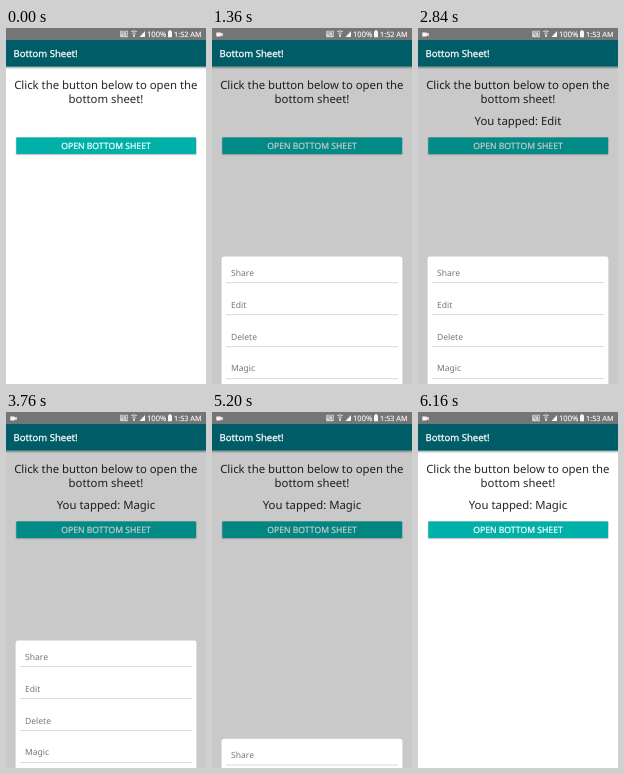
These frames come from a looping animation (200 px wide and 356 px high, 6200 ms). An HTML page:

```html
<!DOCTYPE html>
<html lang="en">
<head>
<meta charset="utf-8">
<title>Bottom Sheet</title>
<style>
html, body { margin: 0; width: 100%; height: 100%; overflow: hidden; background: #fff; }
svg { display: block; width: 200px; height: 356px; font-family: "Noto Sans", "Open Sans", sans-serif; text-rendering: geometricPrecision; }
.status { font-size: 7.3px; fill: #f6f6f6; }
.status text { stroke: #f6f6f6; stroke-width: .15; }
.title { font-size: 9.55px; fill: #fff; stroke: #fff; stroke-width: .25; }
.body { font-size: 11.35px; fill: #262626; text-anchor: middle; }
.label { font-size: 8.65px; fill: #fff; stroke: #fff; stroke-width: .2; text-anchor: middle; }
.item { font-size: 8.55px; fill: #777; }
.line { fill: #cfcfcf; }
.hit { fill: #f1f1f1; }

/* hard switches */
.cut { animation: 6.2s step-end infinite; visibility: hidden; }
#camera { animation-name: camera; }
#before { animation-name: before; }
#after { animation-name: after; }
#dim { animation-name: dim; }
#share { animation-name: share; }
#edit { animation-name: edit; }
#delete { animation-name: delete; }
#magic { animation-name: magic; }
#hit1 { animation-name: hit1; }
#hit2 { animation-name: hit2; }
#hit3 { animation-name: hit3; }
#hit4 { animation-name: hit4; }
@keyframes camera { 0% { visibility: hidden } .645%, 100% { visibility: visible } }
@keyframes before { 0% { visibility: visible } 38.71%, 100% { visibility: hidden } }
@keyframes after { 0% { visibility: hidden } 38.71%, 100% { visibility: visible } }
@keyframes dim {
  0%, 71.613%, 99.355%, 100% { visibility: hidden }
  17.419%, 82.581% { visibility: visible }
}
@keyframes share { 0%, 42.581%, 100% { visibility: hidden } 32.903% { visibility: visible } }
@keyframes edit { 0%, 49.677%, 100% { visibility: hidden } 42.581% { visibility: visible } }
@keyframes delete { 0%, 58.065%, 100% { visibility: hidden } 49.677% { visibility: visible } }
@keyframes magic { 0% { visibility: hidden } 58.065%, 100% { visibility: visible } }
@keyframes hit1 { 0%, 35.484%, 100% { visibility: hidden } 32.903% { visibility: visible } }
@keyframes hit2 { 0%, 45.806%, 100% { visibility: hidden } 42.581% { visibility: visible } }
@keyframes hit3 { 0%, 52.258%, 100% { visibility: hidden } 49.677% { visibility: visible } }
@keyframes hit4 { 0%, 60.645%, 100% { visibility: hidden } 58.065% { visibility: visible } }

/* eased motion */
#sheet { animation: sheet 6.2s ease-in-out infinite; }
@keyframes sheet {
  0%, 17.419%, 69.032%, 82.581%, 97.419%, 100% { transform: translateY(129px) }
  21.935%, 66.855%, 86.452%, 95.242% { transform: translateY(0) }
}
#press { animation: press 6.2s linear infinite; }
@keyframes press {
  0%, 14%, 20%, 81.1%, 85%, 100% { opacity: 0 }
  16.5%, 82.4% { opacity: .08 }
}
</style>
</head>
<body>
<svg viewBox="0 0 200 356">
  <defs>
    <linearGradient id="shade" x2="0" y2="1">
      <stop stop-opacity=".35"/>
      <stop offset="1" stop-opacity="0"/>
    </linearGradient>
  </defs>
  <rect width="200" height="356" fill="#fff"/>

  <g class="body">
    <text x="99.8" y="61.3">Click the button below to open the</text>
    <text x="100" y="74.8">bottom sheet!</text>
    <text id="share" class="cut" x="100" y="97.3">You tapped: Share</text>
    <text id="edit" class="cut" x="100" y="97.3">You tapped: Edit</text>
    <text id="delete" class="cut" x="100" y="97.3">You tapped: Delete</text>
    <text id="magic" class="cut" x="100" y="97.3">You tapped: Magic</text>
  </g>

  <rect x="9.7" y="109" width="180.9" height="18.2" rx="1.5" fill-opacity=".2"/>
  <rect x="10.3" y="109.4" width="179.8" height="16.7" rx="1.2" fill="#00b1aa"/>
  <rect id="press" x="10.3" y="109.4" width="179.8" height="16.7" rx="1.2"/>
  <text class="label" x="100" y="121.2">OPEN BOTTOM SHEET</text>

  <rect y="38.7" width="200" height="2.5" fill="url(#shade)"/>
  <rect id="dim" class="cut" y="38.7" width="200" height="318" fill="#060008" fill-opacity=".21"/>

  <rect width="200" height="38.7" fill="#005c66"/>
  <rect width="200" height="12" fill="#757575"/>
  <text class="title" x="7.6" y="29">Bottom Sheet!</text>

  <g class="status">
    <path id="camera" class="cut" d="M4.3 4.4h4.4v1.3l2-1v3.6l-2-1v1.3H4.3z"/>
    <path d="M114.2 2.8h7.6v6.4h-7.6z" fill-opacity=".75"/>
    <path d="M115.3 5.2q2.8.2 3 3M115.3 4h5.3v4" fill="none" stroke="#757575" stroke-width=".7"/>
    <path d="M125.2 3.6q2.8-1.4 5.6 0M126.3 5.3q1.7-.9 3.4 0" fill="none" stroke="#f6f6f6" stroke-width=".8"/>
    <path d="M127.3 6.3h1.4v2.6h-1.4z"/>
    <path d="M139 3v6h-5.5z"/>
    <text x="141" y="8.9" font-size="7.6">100%</text>
    <path d="M163 3.2v-.9h2v.9h1V9.3h-4V3.2z"/>
    <text id="before" class="cut" x="168" y="8.9">1:52 AM</text>
    <text id="after" class="cut" x="168" y="8.9">1:53 AM</text>
  </g>

  <g id="sheet">
    <rect x="9.6" y="228.4" width="180.8" height="140" rx="2.5" fill="#fff"/>
    <rect id="hit1" class="cut hit" x="14" y="233" width="172" height="22"/>
    <rect id="hit2" class="cut hit" x="14" y="265" width="172" height="22"/>
    <rect id="hit3" class="cut hit" x="14" y="297" width="172" height="22"/>
    <rect id="hit4" class="cut hit" x="14" y="329" width="172" height="22"/>
    <g class="line">
      <rect x="14" y="254.3" width="172" height=".8"/>
      <rect x="14" y="286.3" width="172" height=".8"/>
      <rect x="14" y="318.3" width="172" height=".8"/>
      <rect x="14" y="350.3" width="172" height=".8"/>
    </g>
    <g class="item">
      <text x="19" y="247.8">Share</text>
      <text x="19" y="279.6">Edit</text>
      <text x="19" y="311.5">Delete</text>
      <text x="19" y="343.4">Magic</text>
    </g>
  </g>
</svg>
</body>
</html>
```
